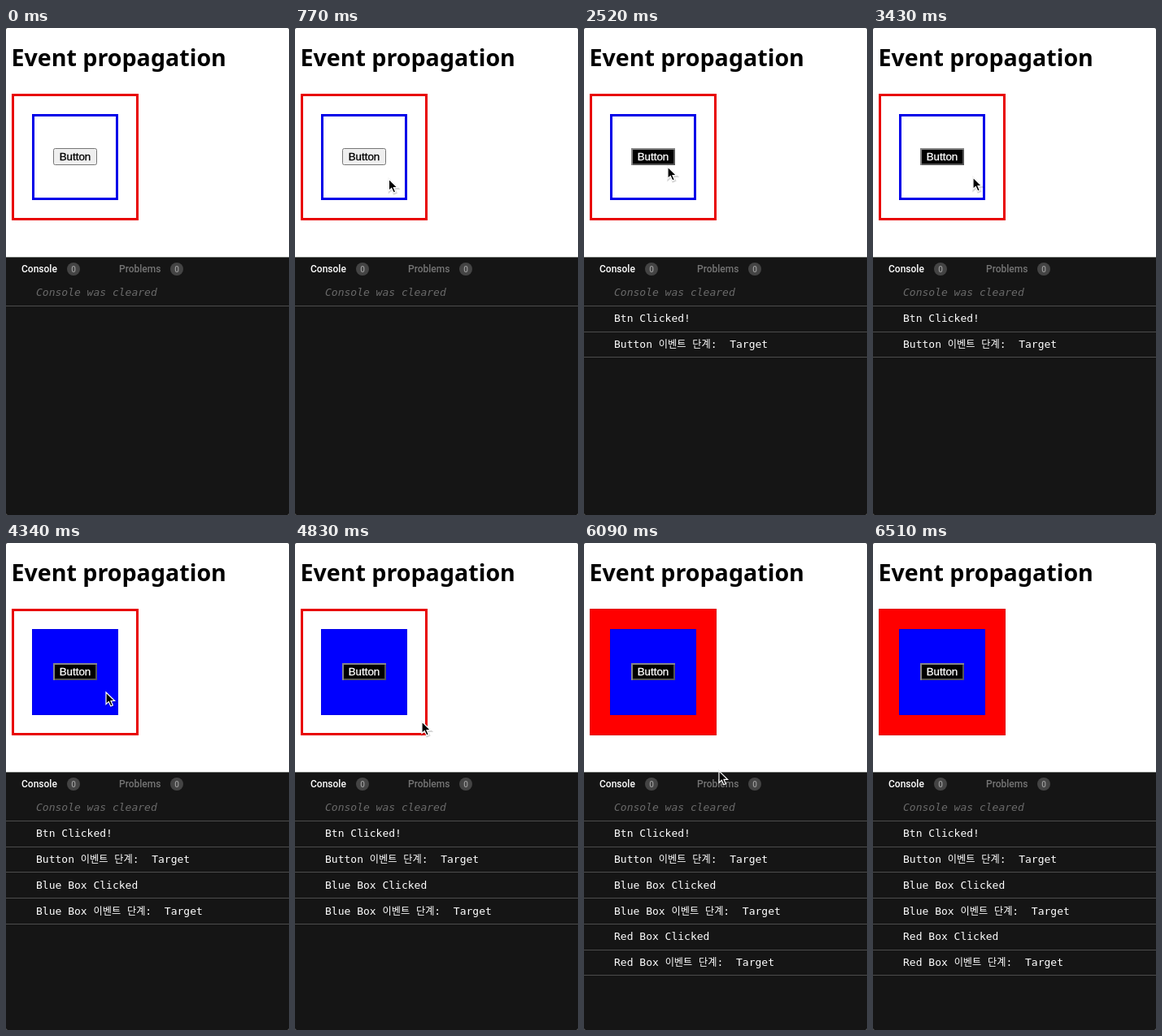
An HTML page that plays this animation: 348 by 600 pixels, repeating every 7000 ms.

```html
<!DOCTYPE html>
<html lang="ko">
<head>
<meta charset="utf-8">
<title>Event propagation</title>
<style>
  html, body { margin: 0; width: 100%; height: 100%; overflow: hidden; background: #222; }
  svg { display: block; width: 348px; height: 600px; border-radius: 2px; }
  text { white-space: pre; }
  .title { font: 700 28.6px "Noto Sans", sans-serif; }
  .tab { font: 500 12px Roboto, sans-serif; }
  .count { font: 500 10px Roboto, sans-serif; fill: #9a9a9a; text-anchor: middle; }
  .log { font: 13px "DejaVu Sans Mono", monospace; fill: #fff; }
  .log.cleared { font-style: italic; fill: #6a6a6a; }
  .ko { font: 12.2px "Noto Sans CJK KR", "Noto Sans CJK", sans-serif; }
  .label { font: 13.333px "Liberation Sans", Arial, sans-serif; text-anchor: middle; stroke-width: .3; }
</style>
</head>
<body>
<svg viewBox="0 0 348 600">
  <rect width="348" height="600" fill="#fff"/>
  <text class="title" x="6.5" y="47">Event propagation</text>

  <rect id="red" x="8.5" y="82.5" width="153" height="153" stroke-width="3"/>
  <rect id="redEdge" x="7.5" y="81.5" width="155" height="155" fill="none" stroke="#dc0000"/>
  <rect id="blue" x="33.5" y="107.5" width="103" height="103" stroke-width="3"/>
  <rect id="blueEdge" x="32.5" y="106.5" width="105" height="105" fill="none" stroke="#0000e8"/>

  <g id="plainButton">
    <rect id="face" x="58.5" y="148.5" width="53" height="20" rx="2" stroke="#767676"/>
    <text class="label" x="85" y="163" stroke="#000">Button</text>
  </g>
  <g id="darkButton">
    <rect x="58" y="148" width="54" height="21" fill="#000"/>
    <path d="M59 169V149H112" fill="none" stroke="#868686" stroke-width="2"/>
    <path d="M60 168H111V150" fill="none" stroke="#555" stroke-width="2"/>
    <rect x="60" y="150" width="50" height="17" fill="#000"/>
    <text class="label" x="85" y="163" fill="#fff" stroke="#fff">Button</text>
  </g>

  <rect y="282" width="348" height="318" fill="#151515"/>
  <rect y="282" width="348" height="1" fill="#6c706c"/>
  <text class="tab" x="19" y="301" fill="#fff">Console</text>
  <text class="tab" x="139" y="301" fill="#757575">Problems</text>
  <circle cx="83" cy="297" r="8" fill="#444"/>
  <text class="count" x="83" y="300.5">0</text>
  <circle cx="210" cy="297" r="8" fill="#444"/>
  <text class="count" x="210" y="300.5">0</text>
  <g id="rows"></g>

  <g id="cursor">
    <g id="ring" fill="none">
      <circle cy="1" r="20" stroke="#fff" stroke-width="6"/>
      <circle cy="1" r="20" stroke="#000" stroke-width="3"/>
    </g>
    <path d="M0 0V14.5L3.3 11.4L5.8 17L8.4 15.9L6 10.5H10.6Z" transform="translate(.6 1.2)"
          fill="none" stroke="#000" stroke-opacity=".16" stroke-width="2.5"/>
    <path d="M0 0V14.5L3.3 11.4L5.8 17L8.4 15.9L6 10.5H10.6Z"
          fill="#000" stroke="#fff" stroke-width="1.2"/>
  </g>
</svg>
<script>
const LOOP = 7000, STEP = 70;
const BUTTON_CLICK = 1680, BLUE_CLICK = 3500, RED_CLICK = 5530;
const HOVER = [1050, BUTTON_CLICK];
const PRESSES = [[1470, 1680], [3360, 3430], [5320, 5460]];
const CURSOR_VISIBLE = [280, 6510];

// Cursor path: time, x, y, ease-out power of the move arriving there
const PATH = [
  [280, 190, 358, 1],
  [980, 108, 169, 2],
  [1050, 92, 160, 1],
  [2450, 92, 160, 1],
  [2520, 103, 171, 1],
  [2870, 122, 205, 1.6],
  [2940, 122, 205, 1],
  [3150, 123, 184, 1.5],
  [4340, 123, 184, 1],
  [4830, 156, 220, 1.6],
  [6020, 156, 220, 1],
  [6440, 216, 585, 1],
];

const phase = '<tspan class="ko">이벤트</tspan> <tspan class="ko">단계</tspan>:  Target';
const LOGS = [
  [0, "Console was cleared"],
  [BUTTON_CLICK, "Btn Clicked!"],
  [BUTTON_CLICK, "Button " + phase],
  [BLUE_CLICK, "Blue Box Clicked"],
  [BLUE_CLICK, "Blue Box " + phase],
  [RED_CLICK, "Red Box Clicked"],
  [RED_CLICK, "Red Box " + phase],
];

const el = id => document.getElementById(id);
const show = (node, on) => node.setAttribute("visibility", on ? "visible" : "hidden");
const within = (t, [from, to]) => t >= from && t < to;

el("rows").innerHTML = LOGS.map(([, text], i) => `<g>
  <text class="log${i ? "" : " cleared"}" x="37" y="${Math.ceil(330 + 31.8 * i)}">${text}</text>
  <rect y="${Math.round(342 + 31.7 * i)}" width="348" height="1" fill="#4c4c4c"/></g>`).join("");
const rows = [...el("rows").children];

function cursorAt(t) {
  const next = PATH.findIndex(key => key[0] >= t);
  if (next < 1) return PATH.at(next).slice(1, 3);
  const [t0, x0, y0] = PATH[next - 1], [t1, x1, y1, power] = PATH[next];
  const k = 1 - (1 - (t - t0) / (t1 - t0)) ** power;
  return [x0 + (x1 - x0) * k, y0 + (y1 - y0) * k];
}

function drawBox(id, clicked, border, fill) {
  el(id).setAttribute("fill", clicked ? fill : "#fff");
  el(id).setAttribute("stroke", clicked ? fill : border);
  show(el(id + "Edge"), clicked);
}

function draw(t) {
  show(el("plainButton"), t < BUTTON_CLICK);
  show(el("darkButton"), t >= BUTTON_CLICK);
  const hovered = within(t, HOVER);
  el("face").setAttribute("fill", hovered ? "#e5e5e5" : "#efefef");
  el("face").setAttribute("stroke", hovered ? "#4f4f4f" : "#767676");
  drawBox("red", t >= RED_CLICK, "#e80000", "#f00");
  drawBox("blue", t >= BLUE_CLICK, "#0000e8", "#00f");
  rows.forEach((row, i) => show(row, t >= LOGS[i][0]));

  const visible = within(t, CURSOR_VISIBLE);
  show(el("cursor"), visible);
  show(el("ring"), visible && PRESSES.some(press => within(t, press)));
  el("cursor").setAttribute("transform", `translate(${cursorAt(t)})`);
}

function tick() {
  const t = performance.now() % LOOP;
  draw(Math.floor(t / STEP) * STEP);
  requestAnimationFrame(tick);
}
tick();
</script>
</body>
</html>
```
